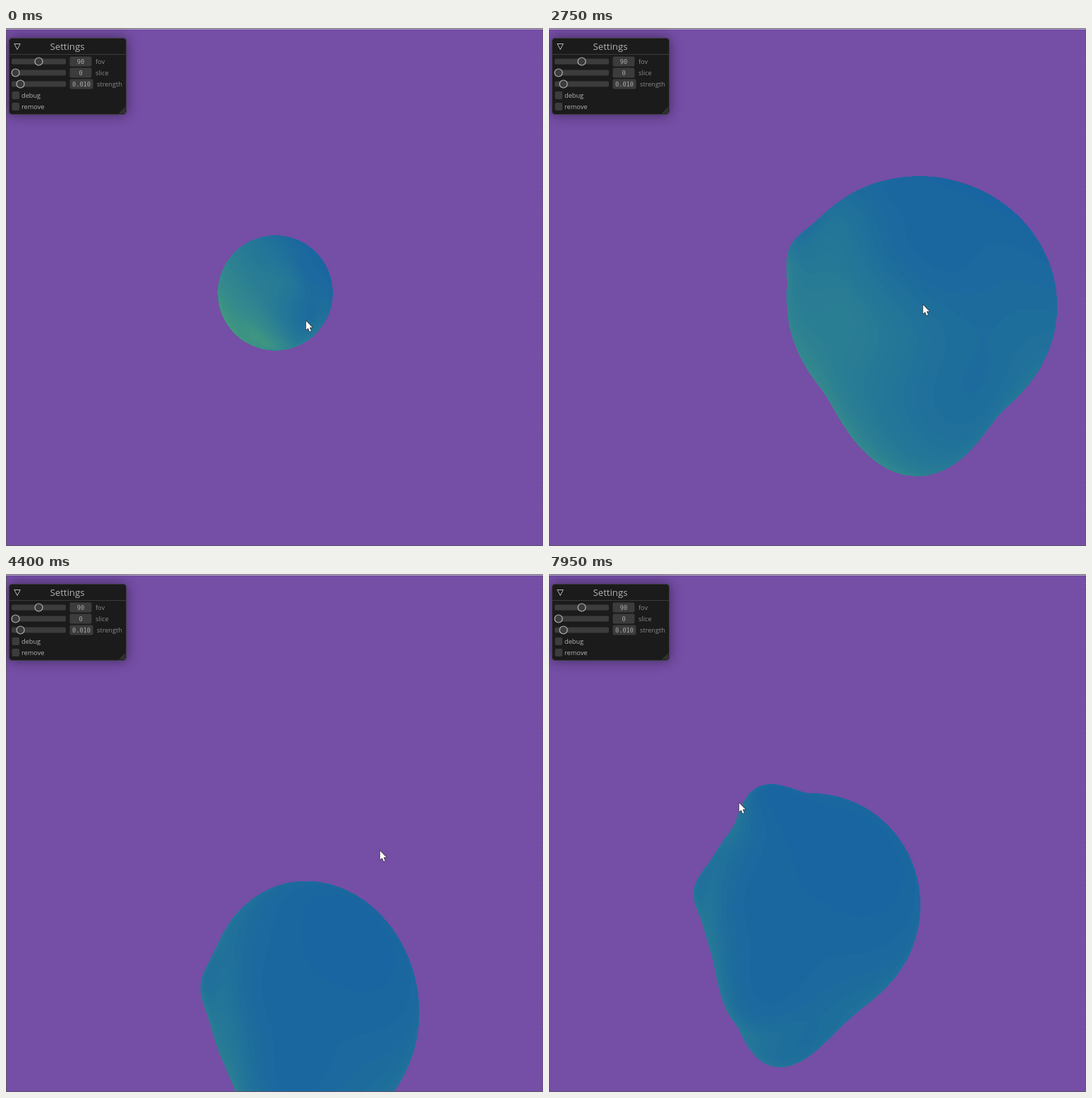
Write an HTML page with a canvas that moves like this. It is 762 px wide and 735 px high and loops after 8 s.

```html
<!DOCTYPE html>
<html lang="en">
<head>
<meta charset="utf-8">
<title>Sculpting</title>
<style>
html, body { margin: 0; width: 100%; height: 100%; overflow: hidden; background: #754ea6; }
canvas { display: block; }
</style>
</head>
<body>
<canvas id="stage" width="762" height="735"></canvas>
<script>
const ctx = document.getElementById('stage').getContext('2d');
const W = 762, H = 735, LOOP = 8000;
const CX = W / 2, CY = H / 2, FOCAL = H / 2; // 90 degree field of view

const lerp = (a, b, u) => a + (b - a) * u;
const clamp = v => Math.max(0, Math.min(1, v));
const mix = (a, b, u) => a.map((v, i) => lerp(v, b[i], u));
const ramp = (t, from, to) => clamp((t - from) / (to - from));
const dot = (a, b) => a[0] * b[0] + a[1] * b[1] + a[2] * b[2];
const unit = a => a.map(v => v / Math.hypot(...a));
const cross = (a, b) => [a[1] * b[2] - a[2] * b[1], a[2] * b[0] - a[0] * b[2], a[0] * b[1] - a[1] * b[0]];

function at(keys, t) {
  let i = 0;
  while (i < keys.length - 2 && t >= keys[i + 1][0]) i++;
  const [t0, a] = keys[i], [t1, b] = keys[i + 1];
  return mix(a, b, ramp(t, t0, t1));
}

// Colour bands from blue (facing the light) to green (facing away).
const LEVELS = 26;
const RAMP = [[24, 101, 161], [34, 115, 153], [42, 126, 147], [52, 138, 140], [66, 155, 125]];
const pack = ([r, g, b]) => (255 << 24 | b << 16 | g << 8 | r) >>> 0;
const BANDS = Array.from({ length: LEVELS + 1 }, (_, i) => {
  const p = i / LEVELS * 4, k = Math.min(3, Math.floor(p));
  return pack(mix(RAMP[k], RAMP[k + 1], p - k).map(Math.round));
});
const BACK = pack([117, 78, 166]);
const LIGHT = unit([.32, -.28, .9]);

// Sculpted bumps on a unit sphere: direction, width, height over time.
const BUMPS = [
  [[-.223, .953, .197], .38, () => .34],
  [[-.36, .6, .7], .3, t => .1 + .08 * ramp(t, 810, 1300)],
  [[-.5, .15, .85], .3, t => .07 * ramp(t, 900, 1500)],
  [[-.92, -.04, .38], .2, t => .08 * ramp(t, 900, 1500)],
  [[-.32, -.62, .72], .26, t => .23 * Math.sin(ramp(t, 5900, 7600) * Math.PI / 2)]
].map(([dir, width, height]) => ({ dir: unit(dir), k: 1 / width ** 2, height }));

// Sphere centre seen from the camera (x, y, z), then yaw, pitch, roll.
const CAMERA = [
  [0, [.013, .1, 4.61, .9, .8, .2]],
  [1640, [.013, .1, 4.61, .9, .8, .2]],
  [2120, [0, .07, 3.17, .75, .76, .2]],
  [2570, [.57, .06, 2.65, .55, .7, .2]],
  [2750, [.738, .115, 2.269, .466, .687, .2]],
  [3160, [.76, .85, 2.42, .22, .07, .2]],
  [3400, [.76, .85, 2.42, .22, .07, .2]],
  [3440, [.741, 1.013, 2.416, .2, -.02, .2]],
  [4310, [.46, 1.56, 2.7, .12, 0, .12]],
  [4400, [.347, 1.512, 2.668, .1, .02, .1]],
  [5030, [-.049, .617, 2.583, 0, 0, 0]],
  [LOOP, [-.049, .617, 2.583, 0, 0, 0]]
];

const ROWS = 80, COLS = 128;
const GRID = [];
for (let i = 0; i <= ROWS; i++) {
  for (let j = 0; j <= COLS; j++) {
    const a = i / ROWS * Math.PI, b = j / COLS * 2 * Math.PI;
    GRID.push([Math.sin(a) * Math.cos(b), Math.cos(a), Math.sin(a) * Math.sin(b)]);
  }
}

function turn(a, b, angle) {
  const c = Math.cos(angle), s = Math.sin(angle);
  return [a * c + b * s, b * c - a * s];
}

// Radius and colour level at a point of the sphere.
function sculpt(p, heights) {
  let radius = 1;
  const slope = [0, 0, 0];
  BUMPS.forEach(({ dir, k }, i) => {
    if (!heights[i]) return;
    const g = heights[i] * Math.exp(-2 * k * (1 - dot(p, dir)));
    radius += g;
    for (let c = 0; c < 3; c++) slope[c] += 2 * k * g * dir[c];
  });
  const along = dot(slope, p);
  const normal = unit(p.map((v, c) => v * (radius + along) - slope[c]));
  return [radius, Math.pow(clamp((1 - dot(normal, LIGHT)) / 2), 1.25)];
}

function projectMesh(t) {
  const heights = BUMPS.map(b => b.height(t));
  const [cx, cy, cz, yaw, pitch, roll] = at(CAMERA, t);
  const toEye = unit([-cx, -cy, -cz]);
  const right = unit([1 - toEye[0] ** 2, -toEye[0] * toEye[1], -toEye[0] * toEye[2]]);
  const down = cross(right, toEye);
  return GRID.map(p => {
    const [radius, level] = sculpt(p, heights);
    let [x, y, z] = p;
    [x, z] = turn(x, z, yaw);
    [z, y] = turn(z, y, pitch);
    [x, y] = turn(x, y, roll);
    const axis = c => radius * (x * right[c] + y * down[c] + z * toEye[c]);
    const depth = cz + axis(2);
    return [CX + FOCAL * (cx + axis(0)) / depth, CY + FOCAL * (cy + axis(1)) / depth, 1 / depth, level];
  });
}

const image = ctx.createImageData(W, H);
const pixels = new Uint32Array(image.data.buffer);
const nearest = new Float32Array(W * H);

function fillTriangle(a, b, c) {
  const area = (b[0] - a[0]) * (c[1] - a[1]) - (c[0] - a[0]) * (b[1] - a[1]);
  if (Math.abs(area) < 1e-6) return;
  const x0 = Math.max(0, Math.ceil(Math.min(a[0], b[0], c[0]) - .5));
  const x1 = Math.min(W - 1, Math.floor(Math.max(a[0], b[0], c[0]) - .5));
  const y0 = Math.max(0, Math.ceil(Math.min(a[1], b[1], c[1]) - .5));
  const y1 = Math.min(H - 1, Math.floor(Math.max(a[1], b[1], c[1]) - .5));
  for (let y = y0; y <= y1; y++) {
    for (let x = x0; x <= x1; x++) {
      const px = x + .5 - a[0], py = y + .5 - a[1];
      const v = (px * (c[1] - a[1]) - py * (c[0] - a[0])) / area;
      const w = (py * (b[0] - a[0]) - px * (b[1] - a[1])) / area;
      const u = 1 - v - w;
      if (u < -1e-5 || v < -1e-5 || w < -1e-5) continue;
      const z = u * a[2] + v * b[2] + w * c[2], i = y * W + x;
      if (z <= nearest[i]) continue;
      nearest[i] = z;
      pixels[i] = BANDS[Math.round(clamp(u * a[3] + v * b[3] + w * c[3]) * LEVELS)];
    }
  }
}

function drawModel(t) {
  pixels.fill(BACK);
  nearest.fill(0);
  const mesh = projectMesh(t);
  for (let i = 0; i < ROWS; i++) {
    for (let j = 0; j < COLS; j++) {
      const k = i * (COLS + 1) + j, below = k + COLS + 1;
      fillTriangle(mesh[k], mesh[k + 1], mesh[below]);
      fillTriangle(mesh[k + 1], mesh[below + 1], mesh[below]);
    }
  }
  ctx.putImageData(image, 0, 0);
}

function box(x, y, w, h, radius, fill) {
  ctx.beginPath();
  ctx.roundRect(x, y, w, h, radius);
  ctx.fillStyle = fill;
  ctx.fill();
}

function label(str, x, y, font, fill, align = 'left') {
  ctx.font = font;
  ctx.fillStyle = fill;
  ctx.textAlign = align;
  ctx.fillText(str, x, y);
}

function line(color, ...pts) {
  ctx.beginPath();
  for (let i = 0; i < pts.length; i += 2) ctx.lineTo(pts[i], pts[i + 1]);
  ctx.strokeStyle = color;
  ctx.lineWidth = 1;
  ctx.stroke();
}

const SANS = '"Open Sans", "Noto Sans", sans-serif';
const MONO = '8.7px "DejaVu Sans Mono", monospace';

function drawPanel() {
  ctx.save();
  ctx.shadowColor = 'rgba(0,0,0,.45)';
  ctx.shadowBlur = 18;
  box(4, 14, 167, 109, 5, '#1b1b1b');
  ctx.restore();
  ctx.beginPath();
  ctx.roundRect(4.5, 14.5, 166, 108, 5);
  ctx.strokeStyle = '#3a3a3a';
  ctx.lineWidth = 1;
  ctx.stroke();
  line('#3c3c3c', 5, 37.5, 170, 37.5);
  line('#b8b8b8', 11.8, 22.5, 20.2, 22.5, 16, 30.5, 11.8, 22.5, 13, 22.5);
  label('Settings', 87, 31, `13.2px ${SANS}`, '#b4b4b4', 'center');

  [['fov', '90', 46.5, 0], ['slice', '0', 13.5, 0], ['strength', '0.010', 20.5, 2]].forEach(([name, val, knob, extra], i) => {
    const y = 47.5 + 16 * i;
    box(8, y - 4, 77, 8, 2, '#3c3c3c');
    ctx.beginPath();
    ctx.arc(knob, y, 5.5, 0, 2 * Math.PI);
    ctx.fillStyle = '#3c3c3c';
    ctx.fill();
    ctx.strokeStyle = '#b4b4b4';
    ctx.lineWidth = 1.2;
    ctx.stroke();
    box(90.5, y - 7, 31 + extra, 14, 2, '#3c3c3c');
    label(val, 106 + extra / 2, y + 3.2, MONO, '#acacac', 'center');
    label(name, 127 + extra, y + 3.2, `9.2px ${SANS}`, '#8a8a8a');
  });
  ['debug', 'remove'].forEach((name, i) => {
    const y = 95.5 + 16 * i;
    box(8.5, y - 5.5, 10.5, 11, 2, '#3c3c3c');
    label(name, 22, y + 3.2, `9.2px ${SANS}`, '#b4b4b4');
  });
  [8, 5, 2].forEach(d => line('#5a5a5a', 169 - d, 121.5, 169.5, 121 - d));
}

function drawFrame() {
  ctx.fillStyle = '#5d5468';
  ctx.fillRect(0, 0, 1, H);
  ctx.fillRect(0, H - 1, W, 1);
  for (let y = 2; y < H; y += 6) ctx.fillRect(W - 1, y, 1, 3);
  ctx.fillStyle = '#6f6878';
  ctx.fillRect(0, 0, W, 1);
  ctx.fillStyle = '#c6c1ca';
  ctx.fillRect(0, 1, W, 1);
}

const MOVES = [
  [0, [426, 416]], [520, [428, 345]], [810, [408, 366]], [1260, [356, 337]], [1680, [531, 393]],
  [5420, [531, 393]], [5500, [488, 393]], [5740, [348, 394]], [5900, [348, 394]]
];

// The last stretch brushes back and forth while drifting up and left.
function cursorAt(t) {
  if (t < 5900) return at(MOVES, t);
  const u = ramp(t, 5900, 7950), wave = Math.sin(8 * Math.PI * u);
  const [x, y] = mix([348, 394], [270, 325], Math.sqrt(u));
  return [x - 24 * wave, y - 30 * wave];
}

function drawCursor([x, y]) {
  const shape = [0,0, 0,12.6, 2.9,10, 5,15, 7.1,14.1, 5,9.3, 8.9,9.1];
  ctx.beginPath();
  for (let i = 0; i < shape.length; i += 2) ctx.lineTo(x - .2 + shape[i], y - .2 + shape[i + 1]);
  ctx.closePath();
  ctx.lineJoin = 'round';
  ctx.lineWidth = 1.4;
  ctx.strokeStyle = '#2a2a2a';
  ctx.stroke();
  ctx.fillStyle = '#fff';
  ctx.fill();
}

function draw(t) {
  drawModel(t);
  drawFrame();
  drawPanel();
  drawCursor(cursorAt(t));
}

const t0 = performance.now();
function tick() {
  draw((performance.now() - t0) % LOOP);
  requestAnimationFrame(tick);
}
tick();
</script>
</body>
</html>
```
